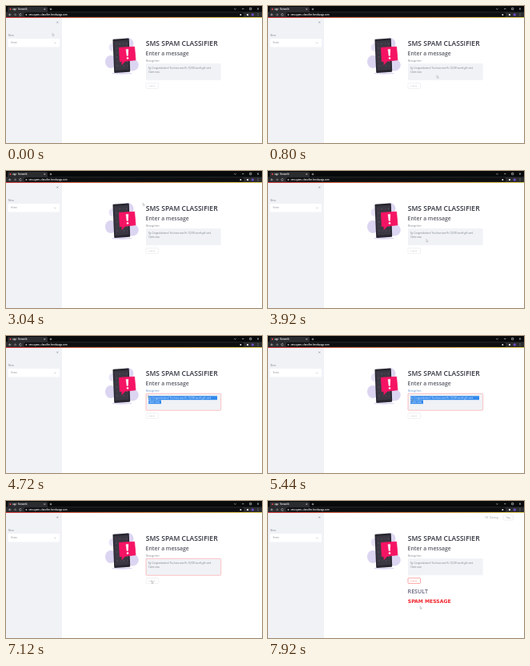
Animation, 320 px wide and 172 px high, one loop 8 s. Source, as an HTML page with a canvas:

```html
<!DOCTYPE html>
<html lang="en">
<head>
<meta charset="utf-8">
<title>SMS spam classifier</title>
<style>
html, body { margin: 0; width: 100%; height: 100%; overflow: hidden; background: #fff; }
canvas { display: block; width: 320px; height: 172px; }
</style>
</head>
<body>
<canvas id="stage"></canvas>
<script>
const W = 320, H = 172, LOOP = 8000;
const canvas = document.getElementById('stage');
const ctx = canvas.getContext('2d');
const dpr = window.devicePixelRatio || 1;
canvas.width = W * dpr;
canvas.height = H * dpr;

const SANS = '"Open Sans", sans-serif';
const INK = '#31333f', MUTED = '#8f919b', PANEL = '#f0f2f6', RED = '#ff4b4b', ICON = '#e4e5e7';

// Pointer stops: time, x, y
const PATH = [
  [0, 58, 34], [120, 60, 35], [620, 205, 96], [800, 211, 87], [1250, 214, 86],
  [1700, 207, 95], [2300, 207, 95], [2640, 190, 80], [2960, 171, 40], [3120, 171, 40],
  [3460, 190, 115], [3620, 200, 95], [4080, 197, 82], [4300, 196, 82], [4620, 178, 76],
  [5350, 178, 76], [5800, 199, 119], [6400, 199, 119], [6900, 182, 100],
  [7300, 182, 100], [7720, 190, 132], [8000, 190, 132]
];
const FOCUS = 4240, DRAG = 4300, DRAG_END = 4620, DESELECT = 5600, SUBMIT = 7200, ANSWER = 7440;

const clamp = v => Math.max(0, Math.min(1, v));
const smooth = v => v * v * (3 - 2 * v);

function pointerAt(t) {
  let i = 0;
  while (i < PATH.length - 2 && t >= PATH[i + 1][0]) i++;
  const [t0, x0, y0] = PATH[i], [t1, x1, y1] = PATH[i + 1];
  const k = smooth(clamp((t - t0) / (t1 - t0)));
  return [x0 + (x1 - x0) * k, y0 + (y1 - y0) * k];
}

function rect(x, y, w, h, fill) {
  ctx.fillStyle = fill;
  ctx.fillRect(x, y, w, h);
}

function box(x, y, w, h, r, fill, stroke, width = 0.5) {
  ctx.beginPath();
  ctx.roundRect(x, y, w, h, r);
  if (fill) { ctx.fillStyle = fill; ctx.fill(); }
  if (stroke) { ctx.strokeStyle = stroke; ctx.lineWidth = width; ctx.stroke(); }
}

function oval(x, y, rx, ry, fill) {
  ctx.beginPath();
  ctx.ellipse(x, y, rx, ry, 0, 0, Math.PI * 2);
  ctx.fillStyle = fill;
  ctx.fill();
}

const dot = (x, y, r, fill) => oval(x, y, r, r, fill);

function trace(p) {
  ctx.beginPath();
  for (let i = 0; i < p.length; i += 2) ctx.lineTo(p[i], p[i + 1]);
}

function line(color, width, ...p) {
  trace(p);
  ctx.strokeStyle = color;
  ctx.lineWidth = width;
  ctx.stroke();
}

// Filled polygon with softly rounded corners
function shape(color, round, ...p) {
  trace(p);
  ctx.closePath();
  ctx.fillStyle = ctx.strokeStyle = color;
  ctx.lineJoin = 'round';
  ctx.lineWidth = round;
  ctx.fill();
  ctx.stroke();
}

function text(s, x, y, size, color, weight = 400, family = SANS) {
  ctx.font = `${weight} ${size}px ${family}`;
  ctx.fillStyle = color;
  ctx.fillText(s, x, y);
}

function cross(x, y, r, color) {
  line(color, 0.6, x - r, y - r, x + r, y + r);
  line(color, 0.6, x - r, y + r, x + r, y - r);
}

function drawBrowser() {
  rect(0, 0, W, 8, '#08090b');
  box(2, 1, 50, 8, 1.5, '#2b2c2f');
  rect(0, 7.4, W, 6.6, '#2b2c2f');
  dot(5.5, 4, 1, RED);
  text('app · Streamlit', 8.2, 5, 2.6, '#fff', 600);
  cross(48.3, 4, 0.8, ICON);
  line(ICON, 0.6, 54.7, 4, 57.3, 4);
  line(ICON, 0.6, 56, 2.7, 56, 5.3);

  line(ICON, 0.6, 285.2, 3.2, 286.4, 4.3, 287.6, 3.2);
  line(ICON, 0.6, 295, 3.6, 297.4, 3.6);
  box(304.6, 2.5, 2.2, 2.2, 0, null, ICON, 0.6);
  cross(315, 3.6, 1.1, ICON);

  line(ICON, 0.6, 5, 9.5, 3.6, 10.9, 5, 12.3);
  line(ICON, 0.6, 3.6, 10.9, 6.4, 10.9);
  line('#a2a4a8', 0.6, 11.2, 9.5, 12.6, 10.9, 11.2, 12.3);
  line('#a2a4a8', 0.6, 9.8, 10.9, 12.6, 10.9);
  ctx.beginPath();
  ctx.arc(18, 10.9, 1.3, 0.4, 5.8);
  ctx.strokeStyle = ICON;
  ctx.stroke();
  box(22.5, 8.3, 275, 5.2, 2.6, '#0d0e10');
  box(24.6, 10.2, 1.6, 1.6, 0.2, '#c8cacd');
  text('sms-spam--classifier.herokuapp.com', 28.5, 11.8, 2.72, '#fff', 600);
  dot(293.3, 10.9, 1, ICON);
  box(301, 9.9, 2, 2, 0.4, ICON);
  dot(308.3, 10.9, 1.7, '#6b4bc0');
  for (let i = -1; i < 2; i++) dot(315, 10.9 + i * 1.2, 0.4, ICON);
}

function drawSidebar() {
  rect(0, 15, 70, H, PANEL);
  cross(64.3, 20.5, 0.9, '#757782');
  text('Menu', 3, 38.2, 2.6, '#7d808b');
  box(2.5, 41, 64.5, 10.5, 1, '#fff');
  text('Home', 6, 47.4, 2.8, MUTED);
  line('#8a8c96', 0.45, 60.4, 45.9, 61.4, 46.9, 62.4, 45.9);
}

function drawIllustration() {
  const lilac = '#dcd5f1';
  oval(152, 47, 7.5, 7, lilac);
  oval(131, 70, 7, 8, lilac);
  oval(158, 74, 7.8, 7.5, lilac);
  oval(133, 52, 4.5, 5, '#e9e4f7');
  oval(145, 84.5, 13, 1.2, lilac);

  shape('#292731', 2, 134.5, 42.8, 152.8, 41.5, 154.2, 81.8, 136.2, 83);
  shape('#3b3843', 0.5, 135.2, 44.5, 152.2, 43.4, 153.3, 79.6, 136.6, 80.7);
  for (let r = 0; r < 6; r++)
    for (let c = 0; c < 4; c++)
      dot(138 + c * 4.2 + r * 0.2, 47.5 + r * 5.5, 0.7, (r + c) % 2 ? '#5e5968' : '#4b4753');

  shape('#f51463', 0.8, 141.4, 52.3, 160.6, 51.2, 162, 67.8, 149.2, 69.2, 145, 73.6, 145, 69.6, 142.3, 69.8);
  shape('#fff', 0.3, 149.9, 54.4, 152.9, 54.2, 152.6, 62.6, 151, 62.7);
  dot(152, 65.5, 1.3, '#fff');
}

function drawForm(t) {
  const focused = t >= FOCUS && t < SUBMIT;
  const selected = t >= DRAG && t < DESELECT;
  const sent = t >= SUBMIT;
  text('SMS SPAM CLASSIFIER', 174.7, 50.4, 8.55, INK, 600);
  text('Enter a message', 174.6, 61.6, 6.85, '#5a5c66', 600);
  text('Message here', 175, 69.5, 2.6, selected ? '#5b8fd0' : '#7d808b');

  box(175, 72.3, 93.7, 21, 1, PANEL, focused ? '#ff9c9c' : null, 0.6);
  if (selected) {
    const k = smooth(clamp((t - DRAG) / (DRAG_END - DRAG)));
    const left = 264 - 86 * clamp(k * 2 - 1);
    const low = 194 - 16 * clamp(k * 2);
    if (k > 0.5) rect(left, 75.3, 264 - left, 4.9, '#3289ec');
    rect(low, 80.5, 194 - low, 4.7, '#3289ec');
  }
  const ink = selected && t >= DRAG_END ? '#eef5ff' : '#7d808b';
  text('Eg: Congratulations! You have won Rs.10,000 worth gift card.', 178, 78.7, 2.8, ink);
  text('Claim now.', 178, 83.9, 2.8, ink);

  box(175, 96.8, 15.5, 6.6, 0.8, '#fff', sent ? RED : '#e0e1e5');
  text('SUBMIT', 177.6, 101, 2.5, sent ? RED : '#a3a5ad');
}

function drawResult(t) {
  if (t >= SUBMIT) {
    ctx.beginPath();
    ctx.arc(273.3, 20.8, 1.3, t / 150, t / 150 + 4.6);
    ctx.strokeStyle = '#9699a4';
    ctx.lineWidth = 0.6;
    ctx.stroke();
    text('Running...', 277, 21.8, 2.7, '#9a9ca6');
    box(294, 17.7, 12.5, 6.2, 0.8, '#fff', '#dcdde2');
    text('Stop', 297.5, 21.8, 2.6, MUTED);
  }
  if (t >= ANSWER) {
    text('RESULT', 174.6, 116.4, 7.1, '#62617d', 600);
    text('SPAM MESSAGE', 174.8, 128, 6.1, '#f0232b', 700, '"DejaVu Sans", sans-serif');
  }
}

function drawPointer(t) {
  const [x, y] = pointerAt(t);
  const overText = x > 175 && x < 268.7 && y > 72.3 && y < 93.3;
  if (overText && t > 4000 && t < 5500) {
    line('#555', 0.5, x, y - 1.8, x, y + 2.2);
    return;
  }
  trace([x, y, x, y + 3.4, x + 0.8, y + 2.7, x + 1.4, y + 3.9, x + 1.9, y + 3.6, x + 1.4, y + 2.5, x + 2.4, y + 2.4]);
  ctx.closePath();
  ctx.fillStyle = '#fff';
  ctx.fill();
  ctx.strokeStyle = '#85878f';
  ctx.lineWidth = 0.35;
  ctx.stroke();
}

function draw(t) {
  ctx.setTransform(dpr, 0, 0, dpr, 0, 0);
  rect(0, 0, W, H, '#fff');
  drawBrowser();
  drawSidebar();
  const strip = ctx.createLinearGradient(0, 0, W, 0);
  strip.addColorStop(0, '#d5383b');
  strip.addColorStop(1, '#e3d055');
  rect(0, 14, W, 1, strip);
  drawIllustration();
  drawForm(t);
  drawResult(t);
  drawPointer(t);
}

const start = performance.now();
function tick() {
  draw((performance.now() - start) % LOOP);
  requestAnimationFrame(tick);
}
tick();
</script>
</body>
</html>
```
